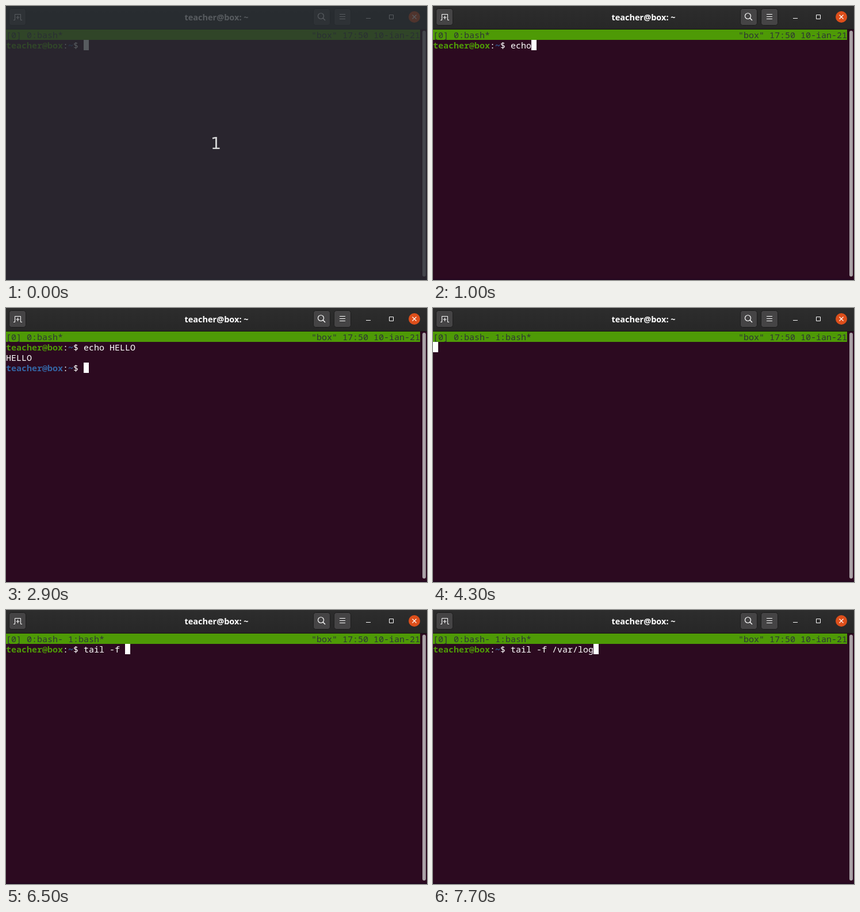
An HTML page that plays this animation: 732x477 px, repeating every 8000 ms.

```html
<!DOCTYPE html>
<html lang="en">
<head>
<meta charset="utf-8">
<title>Terminal</title>
<style>
html, body { margin: 0; width: 100%; height: 100%; overflow: hidden; background: #2c0a20; }
#stage { position: relative; width: 732px; height: 477px; overflow: hidden; background: #2c0a20; }
#stage > * { position: absolute; left: 0; top: 0; }
#title { width: 732px; text-align: center; color: #fff; font: bold 14.5px/38px "Noto Sans", "Open Sans", sans-serif; }
pre { margin: 0; font: 15px/18px "Noto Sans Mono", "DejaVu Sans Mono", monospace; font-variant-ligatures: none; }
#stage > #bar { top: 41px; width: 720px; height: 18px; background: #4e9a06; color: #2e3436; }
#clock { position: absolute; right: 0; top: 0; }
#stage > #screen { top: 59px; color: #fff; }
#screen b { color: #4e9a06; }
#screen b + b { color: #3465a4; }
#stage > #cursor { width: 9px; height: 18px; background: #fff; }
#shade { width: 732px; height: 477px; background: rgba(40, 45, 51, .78); }
#shade span { position: absolute; left: 0; width: 730px; top: 219px; text-align: center; color: #d4d5d6;
  font: 29px/40px "DejaVu Sans", sans-serif; }
</style>
</head>
<body>
<div id="stage">
  <svg width="732" height="477" fill="none" stroke="#fff">
    <defs>
      <linearGradient id="head" x2="0" y2="1">
        <stop stop-color="#2d2d2d"/><stop offset="1" stop-color="#272727"/>
      </linearGradient>
    </defs>
    <rect width="732" height="40" fill="url(#head)" stroke="none"/>
    <path d="M0 40.5H732" stroke="#161214"/>
    <path d="M0 476H732" stroke="#22071f" stroke-width="2"/>
    <g fill="#454445" stroke="#1c1c1c">
      <rect x="5.5" y="4.5" width="29" height="29" rx="4"/>
      <rect x="534.5" y="4.5" width="29" height="29" rx="4"/>
      <rect x="570.5" y="4.5" width="29" height="29" rx="4"/>
    </g>
    <path d="M13 24.5H15.5V14.5H25.5V24.5H28M20.5 17V23M17.5 20H23.5"/>
    <circle cx="547.5" cy="17.5" r="5" stroke-width="1.2"/>
    <path d="M551 21L555 25" stroke-width="1.4"/>
    <path d="M580 14.5H590M580 18.5H590M580 22.5H590M626 21.5H634M666.5 15.5H673.5V22.5H666.5Z"/>
    <circle cx="710" cy="19" r="10" fill="#dd4f1b" stroke="none"/>
    <path d="M706.5 15.5L713.5 22.5M713.5 15.5L706.5 22.5" stroke-width="1.2"/>
    <rect x="724" y="43" width="6" height="428" rx="3" fill="#aaa2a7" stroke="none"/>
  </svg>
  <div id="title"></div>
  <pre id="bar"><span id="tabs"></span><span id="clock"></span></pre>
  <div id="cursor"></div>
  <pre id="screen"></pre>
  <div id="shade"><span>1</span></div>
</div>
<script>
const $ = id => document.getElementById(id);
const LOOP = 8000, COL = 9, ROW = 18, TOP = 59;
const user = "teacher", host = "box";
const prompt = `<b>${user}@${host}</b>:<b>~</b>$ `;
const promptCols = user.length + host.length + 5;

// One entry per key press; equal times land together.
const echo = { text: "echo HELLO", keys: [500, 600, 700, 1000, 1100, 1700, 1900, 2000, 2200, 2500] };
const tail = { text: "tail -f /var/log", keys: [5300, 5500, 5600, 5900, 5900, 6200, 6400, 6500,
  6700, 6800, 7000, 7100, 7400, 7500, 7700, 7700] };
const typed = (cmd, t) => cmd.text.slice(0, cmd.keys.filter(k => k <= t).length);

$("title").textContent = `${user}@${host}: ~`;
$("clock").textContent = `"${host}" 17:50 10-ian-21`;

function state(t) {
  if (t >= 4300 && t < 4500) return { html: "", col: 0, row: 0 };
  if (t >= 2900 && t < 4300) {
    return { html: `${prompt}${echo.text}\nHELLO\n${prompt}`, col: promptCols, row: 2 };
  }
  const line = typed(t < 2900 ? echo : tail, t);
  return { html: prompt + line, col: promptCols + line.length, row: 0 };
}

let shown;
function draw() {
  const t = performance.now() % LOOP;
  const { html, col, row } = state(t);
  if (html !== shown) $("screen").innerHTML = shown = html;
  $("cursor").style.left = col * COL + "px";
  $("cursor").style.top = TOP + row * ROW + "px";
  $("tabs").textContent = t < 4300 ? "[0] 0:bash*" : "[0] 0:bash- 1:bash*";
  $("shade").style.display = t < 200 ? "block" : "none";
  requestAnimationFrame(draw);
}
draw();
</script>
</body>
</html>
```
